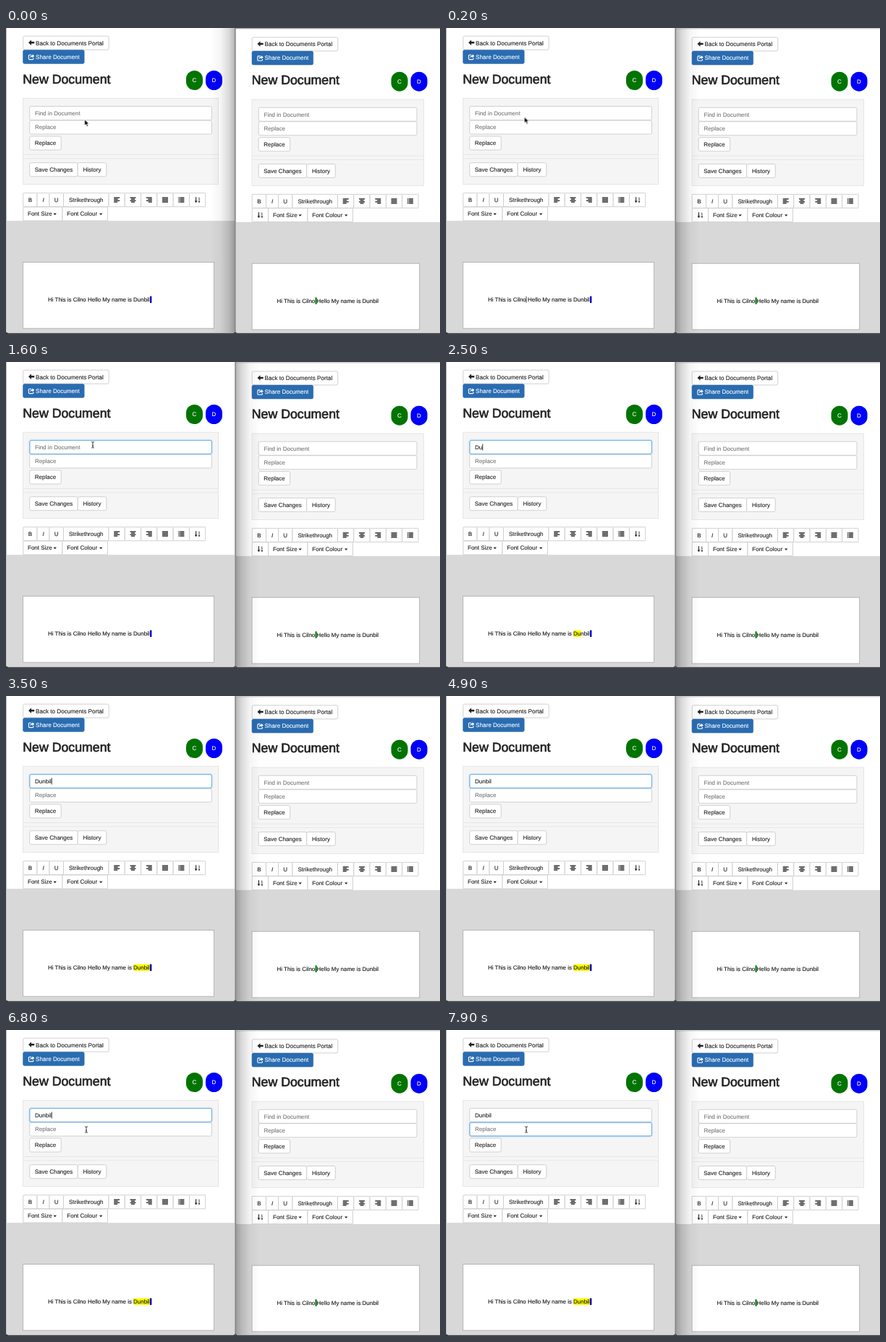
Write an HTML page that moves like this. It is 600x424 px and loops after 8 s.

```html
<!DOCTYPE html>
<html lang="en">
<head>
<meta charset="utf-8">
<title>New Document</title>
<style>
html, body { margin: 0; width: 100%; height: 100%; overflow: hidden; background: #fff; }
svg { display: block; }
#stage { width: 600px; height: 424px; }
text {
  font: 8px "Liberation Sans", Arial, sans-serif; fill: #222; stroke: #222; stroke-width: .12px;
  text-rendering: geometricPrecision; white-space: pre;
}
.mid { text-anchor: middle; }
.hint { fill: #777; stroke: #777; }
.light { fill: #fff; stroke: #fff; }
.doc { font-size: 7.95px; fill: #111; }
.title { font-size: 17.75px; stroke-width: .65px; }
.btn, .field { fill: #fff; stroke: #c6c6c6; stroke-width: .8px; }
.ring { fill: none; stroke: #66afe9; stroke-width: .9px; filter: drop-shadow(0 0 1.3px rgba(102, 175, 233, .6)); }

/* everything that moves shares one 8 s clock */
.step { animation: 8s step-end infinite; }
.ring, #pointer { animation: 8s linear infinite; }
#right-front { animation-name: before; }
#left-front { animation-name: after; }
#find-ring { animation-name: findRing; }
#swap-ring { animation-name: swapRing; }
#typed-clip, #mark { animation-name: type; }
#find-caret { animation-name: findBlink, shift; }
#swap-caret { animation-name: swapBlink; }
#doc-caret { animation-name: docBlink; }
#pointer { animation-name: move; }
#arrow { animation-name: arrow; }
#beam { animation-name: beam; }

@keyframes before { 0% { visibility: visible } 1.25%, 100% { visibility: hidden } }
@keyframes after { 0% { visibility: hidden } 1.25%, 100% { visibility: visible } }
@keyframes findRing { 0%, 12.5% { opacity: 0 } 14.375%, 87.5% { opacity: 1 } 89.375%, 100% { opacity: 0 } }
@keyframes swapRing { 0%, 87.5% { opacity: 0 } 89.375%, 100% { opacity: 1 } }
@keyframes hint { 0% { visibility: visible } 28.75%, 100% { visibility: hidden } }
@keyframes type {
  0% { width: 0px } 28.75% { width: 5.8px } 31.25% { width: 10.2px } 33.75% { width: 14.7px }
  36.25% { width: 19.1px } 38.75% { width: 20.9px } 41.25%, 100% { width: 22.9px }
}
@keyframes shift {
  0% { transform: none } 28.75% { transform: translateX(5.8px) } 31.25% { transform: translateX(10.2px) }
  33.75% { transform: translateX(14.7px) } 36.25% { transform: translateX(19.1px) }
  38.75% { transform: translateX(20.9px) } 41.25%, 100% { transform: translateX(22.7px) }
}
@keyframes findBlink {
  0%, 18.75%, 47.5%, 60%, 72.5%, 87.5%, 100% { visibility: hidden }
  12.5%, 25%, 53.75%, 66.25%, 78.75% { visibility: visible }
}
@keyframes swapBlink { 0%, 93.75%, 100% { visibility: hidden } 87.5% { visibility: visible } }
@keyframes docBlink { 0%, 7.5%, 100% { visibility: hidden } 1.25% { visibility: visible } }
@keyframes move {
  0% { transform: translate(108.7px, 127px) }
  2.5%, 4% { transform: translate(108.5px, 123.5px) }
  11%, 68.75% { transform: translate(120px, 114.7px) }
  76.25%, 100% { transform: translate(111px, 138px) }
}
@keyframes arrow { 0% { visibility: visible } 5%, 100% { visibility: hidden } }
@keyframes beam { 0%, 28.75% { visibility: hidden } 5%, 68.75%, 100% { visibility: visible } }
</style>
</head>
<body>
<svg id="stage" viewBox="0 0 600 424"></svg>
<script>
const rect = (x, y, w, h, attrs = '') => `<rect x="${x}" y="${y}" width="${w}" height="${h}" ${attrs}/>`;
const path = (d, attrs = '') => `<path d="${d}" ${attrs}/>`;
const text = (x, y, s, cls = '', attrs = '') => `<text x="${x}" y="${y}" class="${cls}" ${attrs}>${s}</text>`;
const button = (x, end, y, label = '', style = '', rx = 2.2) =>
  rect(x, y, end - x, 19, `class="btn" rx="${rx}"`) +
  text((x + end) / 2, y + 12.4, label, 'mid', `style="${style}"`);
const tool = (x, end, y, label, style) => button(x, end, y, label, style, .6);
const field = (y, w, hint, attrs = '') =>
  rect(32.7, y, w, 19, 'class="field" rx="2.2"') + text(40, y + 12.4, hint, 'hint', attrs);
const ring = (y, id) => rect(32.7, y, 251.8, 19, `class="ring" rx="2.2" id="${id}"`);
const caret = (x, y, id) => rect(x, y, .8, 9, `class="step" id="${id}" fill="#111"`);
const drop = (x, y) => path(`M${x} ${y}h4.4l-2.2 2.4z`, 'fill="#222"');
const shadow = flip =>
  `<g transform="translate(317 0) scale(${flip} 1)">${rect(0, 0, 34, 422.4, 'fill="url(#shade)"')}</g>`;

// four stacked bars; align is 0 left, .5 centre, 1 right
function bars(cx, cy, widths, align) {
  return widths.map((w, i) => rect(cx - 4 + (8 - w) * align, cy - 3.7 + i * 2, w, 1.3, 'fill="#222"')).join('');
}

function listIcon(cx, cy) {
  return [0, 1, 2, 3].map(i => {
    const y = cy - 3.7 + i * 2;
    return rect(cx - 4, y, 1.4, 1.3, 'fill="#222"') + rect(cx - 2, y, 6, 1.3, 'fill="#222"');
  }).join('');
}

function sortIcon(cx, cy) {
  return path(`M${cx - 2.6} ${cy - 4}h1.1v5.2h1.4l-1.95 2.8l-1.95 -2.8h1.4z`, 'fill="#222"') +
    text(cx + 2.3, cy - .4, '1', 'mid', 'style="font-size:4.6px"') +
    text(cx + 2.3, cy + 4, '9', 'mid', 'style="font-size:4.6px"');
}

function toolbar(wrap) {
  const y = 228.7, cy = 238.2, shift = wrap ? 22.5 : 0;
  let s = tool(23.7, 43, y, 'B') + tool(43, 60, y, 'I', 'font-style:italic') +
    tool(60, 79.5, y, 'U') + tool(79.5, 142, y, 'Strikethrough');
  for (let i = 0; i < 5; i++) s += tool(142 + i * 22.3, 164.3 + i * 22.3, y);
  s += bars(153.2, cy, [8, 5.5, 8, 5], 0) + bars(175.5, cy, [8, 5, 8, 5], .5) +
    bars(197.8, cy, [8, 5.5, 8, 5], 1) + bars(220, cy, [8, 8, 8, 8], 0) + listIcon(242.4, cy);
  s += wrap ? tool(23.7, 46.2, 248) + sortIcon(35, 257.5)
            : tool(253.5, 275.7, y) + sortIcon(264.7, cy);
  return s + tool(23.7 + shift, 78 + shift, 248) + text(30 + shift, 260.4, 'Font Size') + drop(65.5 + shift, 256.8) +
    tool(78 + shift, 140.5 + shift, 248) + text(84.3 + shift, 260.4, 'Font Colour') + drop(129 + shift, 256.8);
}

function avatar(x, letter, color) {
  return rect(x, 59, 23, 27, `rx="11.5" fill="${color}"`) + text(x + 11.5, 75.3, letter, 'mid light');
}

function page(o) {
  return rect(0, 0, o.width, 430, 'fill="#fff"') + rect(0, 267.2, o.width, 170, 'fill="#d8d8d8"') +
    button(23.7, 142.2, 11.2) + text(41, 23.5, 'Back to Documents Portal', '', 'style="font-size:8.12px"') +
    path('M31 20.3l4 -3.7v2.5h4.2v2.4h-4.2v2.5z', 'fill="#222"') +
    rect(23.5, 30.4, 84.7, 19, 'rx="2.2" fill="#2a6cb1" stroke="#2a65a8" stroke-width=".5"') +
    text(41, 42.8, 'Share Document', 'light', 'style="font-size:8.12px"') +
    path('M35 37.2h-2.6q-1 0 -1 1v4.4q0 1 1 1h4.5q1 0 1 -1v-1.2', 'fill="none" stroke="#fff" stroke-width="1.1"') +
    path('M33.4 41.2q.2 -3.3 3 -3.3v-1.7l2.9 2.6l-2.9 2.6v-1.7q-1.8 0 -3 1.5z', 'fill="#fff"') +
    text(23.2, 76.5, 'New Document', 'title') +
    avatar(o.avatars, 'C', '#007400') + avatar(o.avatars + 27, 'D', '#0000fa') +
    rect(23.6, 97.3, o.panel, 119.5, 'fill="#f5f5f5" stroke="#e2e2e2" stroke-width=".8"') +
    path(`M23.6 175.5h${o.panel}M23.6 180.8h${o.panel}`, 'stroke="#e4e4e4" stroke-width=".8"') +
    field(108.5, o.input, 'Find in Document', o.hint) + field(128, o.input, 'Replace') +
    button(32.7, 76.2, 150, 'Replace') +
    button(32.7, 99.2, 186.7, 'Save Changes') + button(99.2, 138.8, 186.7, 'History') +
    toolbar(o.wrap) +
    rect(23.6, 324.5, o.sheet, 91.7, 'fill="#fff" stroke="#a9a9a9" stroke-width=".8"') +
    (o.mark || '') + text(58, 379, 'Hi This is Cilno Hello My name is Dunbil', 'doc') + o.flag;
}

const left = page({
  width: 317, avatars: 249, panel: 270, input: 251.8, sheet: 264,
  hint: 'style="animation:hint 8s step-end infinite"',
  mark: rect(176.5, 371.6, 0, 9.4, 'id="mark" class="step" fill="#ff0"'),
  flag: rect(199, 371.6, 2.4, 9.4, 'fill="#0000d8"')
});
const right = page({
  width: 290, avatars: 216, panel: 237.3, input: 218.8, sheet: 231.6, wrap: true,
  flag: rect(111, 371.6, 2.2, 9.4, 'fill="#008000"')
});

stage.innerHTML = `
  <defs>
    <linearGradient id="shade"><stop offset="0" stop-opacity=".3"/><stop offset=".25" stop-opacity=".15"/>
      <stop offset=".6" stop-opacity=".04"/><stop offset="1" stop-opacity="0"/></linearGradient>
    <clipPath id="left-win">${rect(.6, -9, 316.2, 431.4, 'rx="3"')}</clipPath>
    <clipPath id="right-win">${rect(317.2, -9, 290, 431.4, 'rx="3"')}</clipPath>
    <clipPath id="typed">${rect(40, 108, 0, 20, 'id="typed-clip" class="step"')}</clipPath>
  </defs>
  ${rect(0, 0, 600, 424, 'fill="#3a3a3a"')}
  ${rect(0, 0, 1, 422, 'fill="#8c949e"')}
  <g clip-path="url(#left-win)">${left}</g>
  ${ring(108.5, 'find-ring')}${ring(128, 'swap-ring')}
  ${text(40, 120.9, 'Dunbil', '', 'clip-path="url(#typed)"')}
  ${caret(40, 113.5, 'find-caret')}${caret(40, 133, 'swap-caret')}${caret(110.6, 371.8, 'doc-caret')}
  <g clip-path="url(#right-win)"><g transform="translate(316.5 1.7)">${right}</g>
    ${rect(317, 0, 283, 1.8, 'fill="#fff"')}</g>
  <g id="right-front" class="step">${shadow(-1)}${rect(317, 0, 283, .8, 'fill="#8a8a8a"')}</g>
  <g id="left-front" class="step">${shadow(1)}${rect(317, 0, 283, .8, 'fill="#c4c4c4"')}</g>
  ${rect(316.6, 0, .8, 424, 'fill="#6a6a6a"')}
  <g id="pointer">
    ${path('M0 0v8l1.9 -1.7l1.4 3.1l1.4 -.6l-1.4 -3h2.5z', 'id="arrow" class="step" fill="#000" stroke="#fff" stroke-width=".6"')}
    ${path('M-2 -4.2q2 0 2 1.2q0 -1.2 2 -1.2M0 -3v6M-2 4.2q2 0 2 -1.2q0 1.2 2 1.2M-1 1.2h2', 'id="beam" class="step" fill="none" stroke="#111" stroke-width=".8"')}
  </g>`;
</script>
</body>
</html>
```
